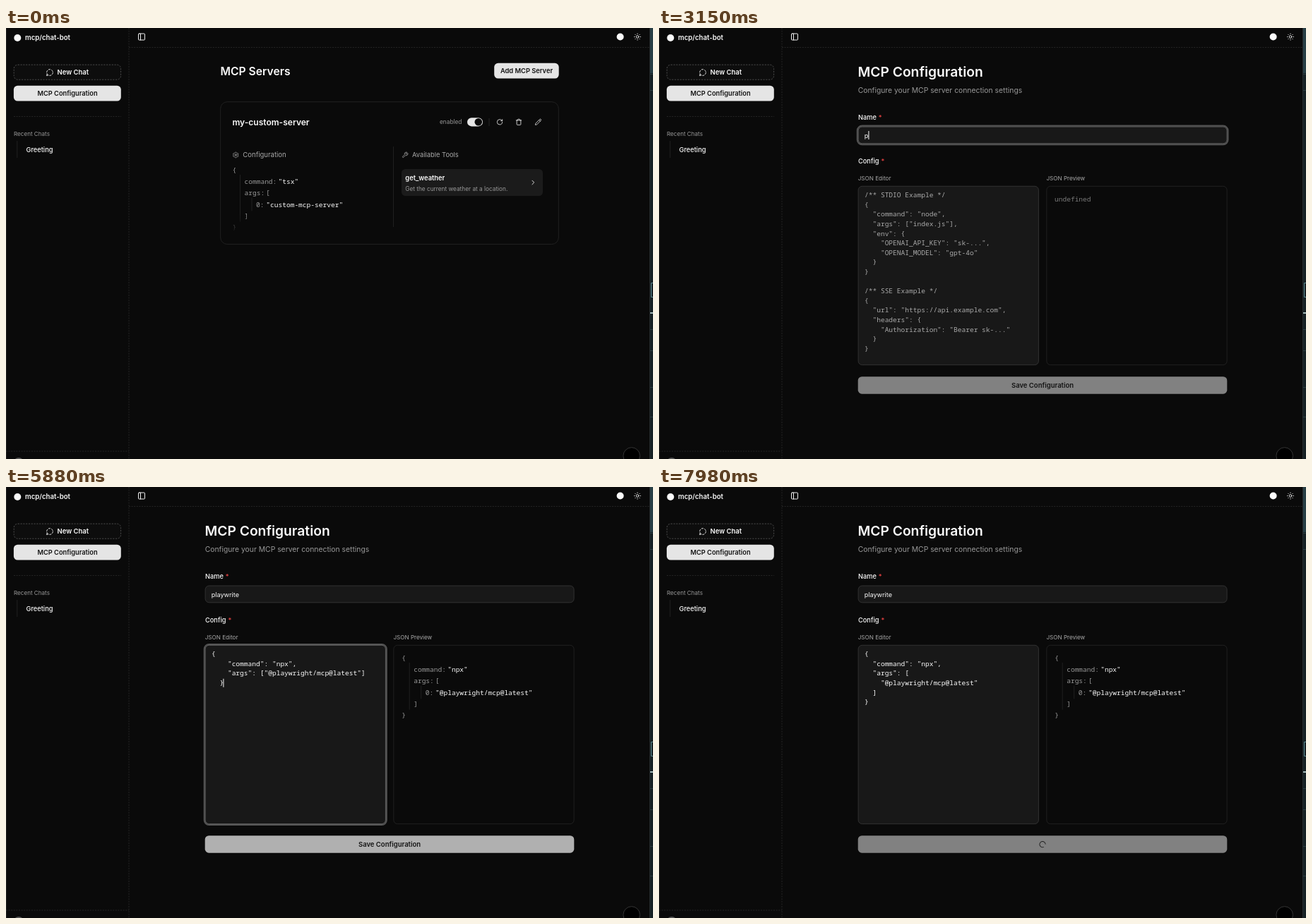
Recreate the animation shown at these times as an HTML page. Size 916 px wide and 611 px high, loop 8 s.

```html
<!DOCTYPE html>
<html lang="en">
<head>
<meta charset="utf-8">
<title>MCP configuration</title>
<style>
  html, body { margin: 0; width: 100%; height: 100%; overflow: hidden; background: #0a0a0a; }
  svg { display: block; width: 100vw; height: 100vh; }
  text { font-family: Inter, "Open Sans", sans-serif; white-space: pre; }
  .mono { font-family: "Noto Sans Mono", "DejaVu Sans Mono", monospace; font-size: 9.55px; }
</style>
</head>
<body>
<svg id="stage" viewBox="0 0 916 611" xmlns="http://www.w3.org/2000/svg"></svg>
<script>
const LOOP = 8000, STEP = 70;
const WHITE = '#fafafa', GREY = '#a9a9a9', DIM = '#989898', LINE = '#262626', DARK = '#141414';

// Drawing helpers; text is placed by the middle of its capitals.
const text = (x, y, s, size, fill = WHITE, weight = 400, extra = '') =>
  `<text x="${x}" y="${y + size * 0.36}" font-size="${size}" fill="${fill}" font-weight="${weight}" ${extra}>${s}</text>`;
const mid = (x, y, s, size, fill, weight, extra = '') =>
  text(x, y, s, size, fill, weight, `text-anchor="middle" ${extra}`);
const mono = (x, y, s, fill = DIM, weight = 400) =>
  `<text class="mono" x="${x}" y="${y + 3.2}" fill="${fill}" font-weight="${weight}">${s}</text>`;
const rect = (x, y, w, h, r, fill, stroke = 'none', extra = '') =>
  `<rect x="${x}" y="${y}" width="${w}" height="${h}" rx="${r}" fill="${fill}" stroke="${stroke}" ${extra}/>`;
const line = (d, stroke = LINE, extra = '') => `<path d="${d}" fill="none" stroke="${stroke}" ${extra}/>`;
const dashed = d => line(d, '#2b2b2b', 'stroke-width=".8" stroke-dasharray="2 1.6"');
const dot = (x, y, r, fill, extra = '') => `<circle cx="${x}" cy="${y}" r="${r}" fill="${fill}" ${extra}/>`;
const group = (id, body, extra = '') => `<g id="${id}" ${extra}>${body}</g>`;
const icon = (x, y, size, body, color = '#ededed') =>
  `<g transform="translate(${x - size / 2} ${y - size / 2}) scale(${size / 24})" fill="none" stroke="${color}"
    stroke-width="2" stroke-linecap="round" stroke-linejoin="round">${body}</g>`;
const path = d => `<path d="${d}"/>`;
const code = (rows, fill) => rows.map((s, i) => mono(291, 237 + 13.6 * i, s, fill)).join('');

const polar = (r, a) => `${(12 + r * Math.cos(a)).toFixed(2)} ${(12 + r * Math.sin(a)).toFixed(2)}`;
const turn = n => Array.from({ length: n }, (_, i) => i * 2 * Math.PI / n);
const gear = path('M' + turn(48).map(a => polar(8.9 + 1.3 * Math.cos(6 * a + Math.PI), a)).join('L') + 'Z')
  + '<circle cx="12" cy="12" r="3"/>';
const sun = '<circle cx="12" cy="12" r="4"/>'
  + path(turn(8).map(a => `M${polar(8.6, a)}L${polar(10, a)}`).join(''));
const wrench = path('M14.7 6.3a1 1 0 0 0 0 1.4l1.6 1.6a1 1 0 0 0 1.4 0l3.77-3.77a6 6 0 0 1-7.94 7.94l-6.91 6.91a2.12 2.12 0 0 1-3-3l6.91-6.91a6 6 0 0 1 7.94-7.94z');
const refresh = path('M21 12a9 9 0 1 1-9-9c2.5 0 4.9 1 6.7 2.7L21 8M21 3v5h-5');
const trash = path('M3 6h18M19 6v14c0 1-1 2-2 2H7c-1 0-2-1-2-2V6M8 6V4c0-1 1-2 2-2h4c1 0 2 1 2 2v2');
const pencil = path('M21.2 6.8a1 1 0 0 0-4-4L3.8 16.2a2 2 0 0 0-.5.8L2 21.4a.5.5 0 0 0 .6.6l4.4-1.3a2 2 0 0 0 .8-.5zM15 5l4 4');
const bubble = '<circle cx="12" cy="12" r="9.5" stroke-dasharray="5.5 4.4"/>' + path('M3.6 17L2 22l5-1.4');
const panel = '<rect x="3" y="3" width="18" height="18" rx="2"/>' + path('M9 3v18');

// Collapsible view of a server's command and its one argument.
const tree = (x, y, cmd, arg) => {
  const row = i => y + 16.3 * i;
  return mono(x, y, '{')
    + line(`M${x + 11} ${y + 6.5}V${row(4) + 8}M${x + 27.5} ${row(2) + 6.5}V${row(3) + 9}`, LINE, 'stroke-width=".8"')
    + mono(x + 17, row(1), 'command:') + mono(x + 65, row(1), `"${cmd}"`, WHITE, 500)
    + mono(x + 17, row(2), 'args:') + mono(x + 47.5, row(2), '[')
    + mono(x + 33.5, row(3), '0:') + mono(x + 47.8, row(3), `"${arg}"`, WHITE, 500)
    + mono(x + 17, row(4), ']') + mono(x, row(5), '}');
};

const frame =
  rect(0, 0, 916, 611, 0, '#0a0a0a') + line('M.4 0V611', '#2a2a2a', 'stroke-width=".8"')
  + dashed('M174 0V611') + dashed('M174 27.5H911') + dashed('M0 600H174') + dashed('M11 125.5H163')
  + dot(16.3, 14, 5, WHITE) + text(27, 14, 'mcp/chat-bot', 9.65, WHITE, 600)
  + rect(11.2, 52.1, 151.4, 21.1, 5.5, '#0d0d0d', '#5a5a5a', 'stroke-width=".8" stroke-dasharray="2.2 1.6"')
  + icon(62, 63, 11, bubble) + text(72.5, 62.8, 'New Chat', 9.5, WHITE, 600)
  + rect(10.9, 81.7, 151.9, 21.8, 5.5, '#e5e5e5') + mid(87, 92.8, 'MCP Configuration', 9.25, DARK, 600)
  + text(11, 150, 'Recent Chats', 8.1, DIM) + line('M15.8 160V184', LINE, 'stroke-width=".8"')
  + text(28.5, 173.1, 'Greeting', 9.25, WHITE, 500)
  + dot(18, 616.5, 7.5, '#555')
  + icon(192, 12.5, 12, panel) + dot(869.6, 12.5, 5, WHITE) + icon(894, 12.5, 11, sun)
  + rect(912, 0, 4, 611, 0, '#162124') + rect(912, 0, 4, 64, 0, '#283f45') + line('M911.5 0V611', '#30383a', 'stroke-width=".8"')
  + line('M912 65.5h4M912 88.5h4M912 427.5h4M912 457.5h4M912 509.5h4M912 551.5h4', '#2c3d40')
  + line('M916 361.5h-2.5v20H916', '#5f8c93') + line('M912 404h4', '#c8e0e0', 'stroke-width="1.6"');

const servers =
  text(303.5, 61, 'MCP Servers', 15.7, WHITE, 600)
  + rect(691.2, 49.8, 91.5, 21.8, 5.5, '#e5e5e5', 'none', 'id="add"') + mid(737, 60.8, 'Add MCP Server', 9.3, DARK, 600)
  + rect(303.7, 104.7, 478.6, 201.8, 9.5, '#0a0a0a', LINE, 'stroke-width=".8"')
  + text(320.4, 133.3, 'my-custom-server', 12.05, WHITE, 600)
  + text(614, 133.4, 'enabled', 8.3, DIM)
  + rect(653, 127.2, 22, 12.2, 6.1, '#e5e5e5') + dot(668.8, 133.3, 5.3, '#0a0a0a')
  + line('M684 128V139', '#2c2c2c', 'stroke-width=".8"')
  + icon(699, 133.3, 9.8, refresh) + icon(726, 133.3, 9.8, trash) + icon(753.5, 133.3, 9.8, pencil)
  + icon(325.2, 180, 9.5, gear, GREY) + text(335.3, 180, 'Configuration', 9.55, GREY)
  + tree(320.5, 201.5, 'tsx', 'custom-mcp-server')
  + rect(318, 262, 220, 28, 0, 'url(#fade)')
  + line('M548.5 168V282', LINE, 'stroke-width=".8"')
  + icon(565, 180, 9.5, wrench, GREY) + text(575, 180, 'Available Tools', 9.35, GREY)
  + rect(560, 200, 200, 38, 5.5, '#1b1b1b')
  + text(565.3, 212.5, 'get_weather', 9.35, WHITE, 600)
  + text(565.3, 227.7, 'Get the current weather at a location.', 8.25, DIM)
  + icon(746.3, 219, 11, path('M9 18l6-6-6-6'));

const hint = [
  '/** STDIO Example */', '{', '  "command": "node",', '  "args": ["index.js"],', '  "env": {',
  '    "OPENAI_API_KEY": "sk-...",', '    "OPENAI_MODEL": "gpt-4o"', '  }', '}', '',
  '/** SSE Example */', '{', '  "url": "https://api.example.com",', '  "headers": {',
  '    "Authorization": "Bearer sk-..."', '  }', '}'];
const pasted = ['{', '    "command": "npx",', '    "args": ["@playwright/mcp@latest"]', '  }'];
const tidy = ['{', '  "command": "npx",', '  "args": [', '    "@playwright/mcp@latest"', '  ]', '}'];

const field = (id, x, y, w, h) =>
  rect(x - 1.4, y - 1.4, w + 2.8, h + 2.8, 6.8, 'none', '#525252', `id="${id}Ring" stroke-width="2"`)
  + rect(x, y, w, h, 5.5, '#181818', '#3a3a3a', `id="${id}Box" stroke-width=".8"`);
const label = (y, s, starX) => text(282, y, s, 9.25, WHITE, 500) + text(starX, y, '*', 9.25, '#ef4444', 500);

const form =
  text(281.5, 62.4, 'MCP Configuration', 19.25, WHITE, 600)
  + text(281.7, 88.2, 'Configure your MCP server connection settings', 10.35, DIM)
  + label(126.3, 'Name', 310.7) + field('name', 282.1, 140, 522, 23.8)
  + text(290.7, 152.4, 'Enter mcp server name', 9.15, GREY, 400, 'id="prompt"')
  + text(290.7, 152.4, '', 9.15, WHITE, 400, 'id="typed"')
  + line('M515.5 155.5h2l1 .8 1-.8h2M518.5 156v11.5M515.5 168h2l1-.8 1 .8h2', '#d0d0d0', 'id="beam" stroke-width=".9"')
  + label(188.8, 'Config', 314.5)
  + text(281.7, 213.2, 'JSON Editor', 8.15, GREY) + text(548.5, 213.2, 'JSON Preview', 8.1, GREY)
  + field('editor', 282.1, 224.3, 255.3, 253.3)
  + group('hint', code(hint, GREY)) + group('pasted', code(pasted, WHITE)) + group('tidy', code(tidy, WHITE))
  + rect(548.8, 224.3, 255.3, 253.3, 5.5, 'none', LINE, 'stroke-width=".8"')
  + group('empty', mono(560, 242.5, 'undefined', '#7a7a7a'))
  + group('preview', tree(560.2, 242.5, 'npx', '@playwright/mcp@latest'))
  + rect(281.7, 494.2, 522.6, 24.5, 5.5, '#808080', 'none', 'id="save"')
  + mid(543, 506.8, 'Save Configuration', 9.5, DARK, 600, 'id="saveText"')
  + icon(543, 506.6, 11, group('spinner', path('M21 12a9 9 0 1 1-6.22-8.56')), '#202020')
  + rect(0, -6, 1, 12, 0, WHITE, 'none', 'id="caret"');

document.getElementById('stage').innerHTML =
  '<defs><linearGradient id="fade" x1="0" y1="0" x2="0" y2="1"><stop stop-color="#0a0a0a" stop-opacity="0"/>'
  + '<stop offset="1" stop-color="#0a0a0a"/></linearGradient></defs>'
  + frame + group('servers', servers) + group('form', form)
  + dot(885.7, 606.5, 11.8, '#000', 'stroke="#3a3a3a" stroke-width=".9"');

const el = id => document.getElementById(id);
const show = (id, on) => el(id).setAttribute('display', on ? 'inline' : 'none');
const within = (t, a, b) => t >= a && t < b;
const ease = (t, start, ms) => {
  const p = Math.min(1, Math.max(0, (t - start) / ms));
  return 1 - (1 - p) ** 2;
};
const paint = (id, attr, v) => {
  const c = Math.round(v);
  el(id).setAttribute(attr, `rgb(${c},${c},${c})`);
};
const focus = (id, border, ring) => {
  paint(id + 'Box', 'stroke', 58 + 62 * border);
  el(id + 'Ring').setAttribute('opacity', ring);
};

const keys = [[3150, 'p'], [3500, 'pla'], [3570, 'play'], [4130, 'playw'],
  [4270, 'playwr'], [4480, 'playwrit'], [4550, 'playwrite']];

function draw(time) {
  const t = Math.floor(time / STEP) * STEP;
  const onForm = t >= 1540;
  show('servers', !onForm);
  show('form', onForm);
  paint('add', 'fill', 229 - 20 * ease(t, 1230, 220));

  let name = '';
  for (const [at, s] of keys) if (t >= at) name = s;
  el('typed').textContent = name;
  show('prompt', !name);
  show('beam', within(t, 4900, 4970));

  const blur = ease(t, 5280, 160), left = ease(t, 6540, 160);
  focus('name', ease(t, 2310, 140) - blur, ease(t, 2370, 130) - blur);
  focus('editor', blur - left, blur - left);

  show('hint', t < 5880);
  show('pasted', within(t, 5880, 7350));
  show('tidy', t >= 7350);
  show('empty', t < 5880);
  show('preview', t >= 5880);

  const inName = within(t, 2380, 2870) || within(t, 3150, 5110);
  const inEditor = within(t, 5320, 6370);
  let x = 290.8, y = 152;
  if (inName && name) x += el('typed').getComputedTextLength();
  if (inEditor) {
    y = 237;
    if (t >= 5880) { x = 307.4; y = 277.8; }
  }
  show('caret', inName || inEditor);
  el('caret').setAttribute('transform', `translate(${x} ${y})`);

  const busy = t >= 6790;
  paint('save', 'fill', 129 + 100 * ease(t, 5850, 110) - 21 * ease(t, 6540, 160) - 79 * ease(t, 6790, 140));
  show('saveText', !busy);
  show('spinner', busy);
  el('spinner').setAttribute('transform', `rotate(${(t - 6790) * 0.36} 12 12)`);
}

const start = performance.now();
(function tick() {
  draw((performance.now() - start) % LOOP);
  requestAnimationFrame(tick);
})();
</script>
</body>
</html>
```
